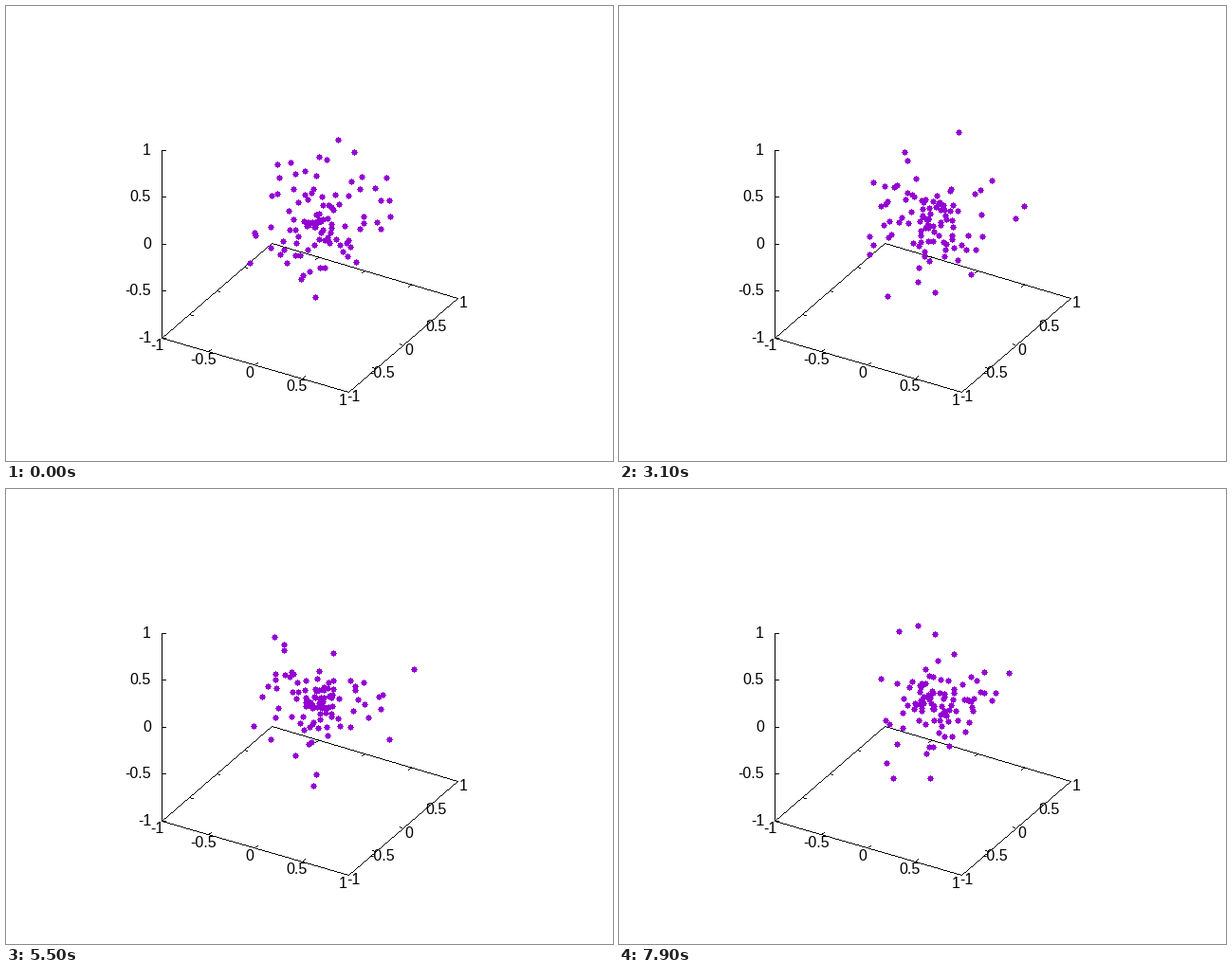
Write a matplotlib script that moves like this. It is 640 px wide and 480 px high and loops after 8000 ms.

```python
import numpy as np
import matplotlib.pyplot as plt
from matplotlib.animation import FuncAnimation
from matplotlib.collections import PolyCollection

W, H, DPI = 640, 480, 100
FRAMES, INTERVAL = 80, 100
VIOLET = "#9400d3"

# Screen vectors of one unit along each axis
EX = np.array([98.25, 28.75])
EY = np.array([57.75, -49.75])
EZ = np.array([0, -99])
FLOOR = np.array([320.25, 328.75])
CENTER = np.array([331, 226])

fig = plt.figure(figsize=(W / DPI, H / DPI), dpi=DPI, facecolor="white")
ax = fig.add_axes([0, 0, 1, 1])
ax.set_xlim(0, W)
ax.set_ylim(H, 0)
ax.axis("off")


def floor(x, y):
    return FLOOR + x * EX + y * EY


def pixel_line(a, b):
    """Unit squares along a one pixel wide line."""
    a, b = np.round(a), np.round(b)
    n = int(np.abs(b - a).max()) + 1
    cells = np.round(np.linspace(a, b, n))
    return cells[:, None, :] + np.array([[0, 0], [1, 0], [1, 1], [0, 1]])


def label(x, y, value, ha="center"):
    ax.text(x, y + 5.5, f"{value:g}", ha=ha, va="baseline", color="black",
            family="Liberation Sans", fontsize=16 * 72 / DPI)


def draw_box():
    corners = [floor(x, y) for x, y in [(-1, -1), (1, -1), (1, 1), (-1, 1)]]
    lines = list(zip(corners, corners[1:] + corners[:1]))
    lines.append((corners[0], corners[0] + 2 * EZ))
    for v in np.linspace(-1, 1, 5):
        z = corners[0] + (v + 1) * EZ
        lines.append((z, z + [4, 0]))
        label(153, z[1] - 0.5, v, "right")
        label(*floor(v, -1) + [-5.3, 8], v)
        label(*floor(1, v) + [6, 4.5], v)
        if abs(v) < 1:
            for s in (-1, 1):
                p, q = floor(v, s), floor(s, v)
                lines.append((p, p - s * 0.05 * EY))
                lines.append((q, q - s * 0.035 * EX))
    pixels = np.concatenate([pixel_line(a, b) for a, b in lines])
    ax.add_collection(PolyCollection(pixels, facecolors="black",
                                     edgecolors="none", antialiaseds=False))


def swarm(n=100, k=0.001, soft=0.15, sub=4):
    """Bodies falling through a softened central pull, projected to screen."""
    rng = np.random.default_rng(12)

    def length(v):
        return np.linalg.norm(v, axis=1, keepdims=True)

    pos = rng.normal(size=(n, 3))
    radius = 0.8 * ((np.arange(n)[:, None] + 0.5) / n) ** 0.85
    pos *= radius / length(pos)
    pos -= pos.mean(axis=0)

    # Cool start, capped so that every body stays bound
    vel = rng.normal(scale=0.4, size=(n, 3))
    vel *= np.minimum(1, 0.8 / length(vel))
    vel *= np.sqrt(k / np.hypot(length(pos), soft))

    path = []
    for _ in range(FRAMES):
        path.append(CENTER + pos @ np.array([EX, EY, EZ]))
        for _ in range(sub):
            vel -= k * pos / np.hypot(length(pos), soft) ** 3 / sub
            pos += vel / sub
    return np.round(path)


def dot_shape():
    """Pixel dot: a five pixel block with a nub on each side."""
    side = np.array([(-2.5, -2.5), (-0.5, -2.5), (-0.5, -3.5),
                     (0.5, -3.5), (0.5, -2.5)])
    turn = np.array([[0, 1], [-1, 0]])
    return 0.5 + np.vstack([side @ np.linalg.matrix_power(turn, q)
                            for q in range(4)])


draw_box()
paths = swarm()
DOT = dot_shape()
dots = PolyCollection([], facecolors=VIOLET, edgecolors="none",
                      antialiaseds=False, zorder=3)
ax.add_collection(dots, autolim=False)


def draw(frame):
    dots.set_verts(paths[frame][:, None, :] + DOT)
    return [dots]


anim = FuncAnimation(fig, draw, frames=FRAMES, interval=INTERVAL, repeat=True)
plt.show()
```
